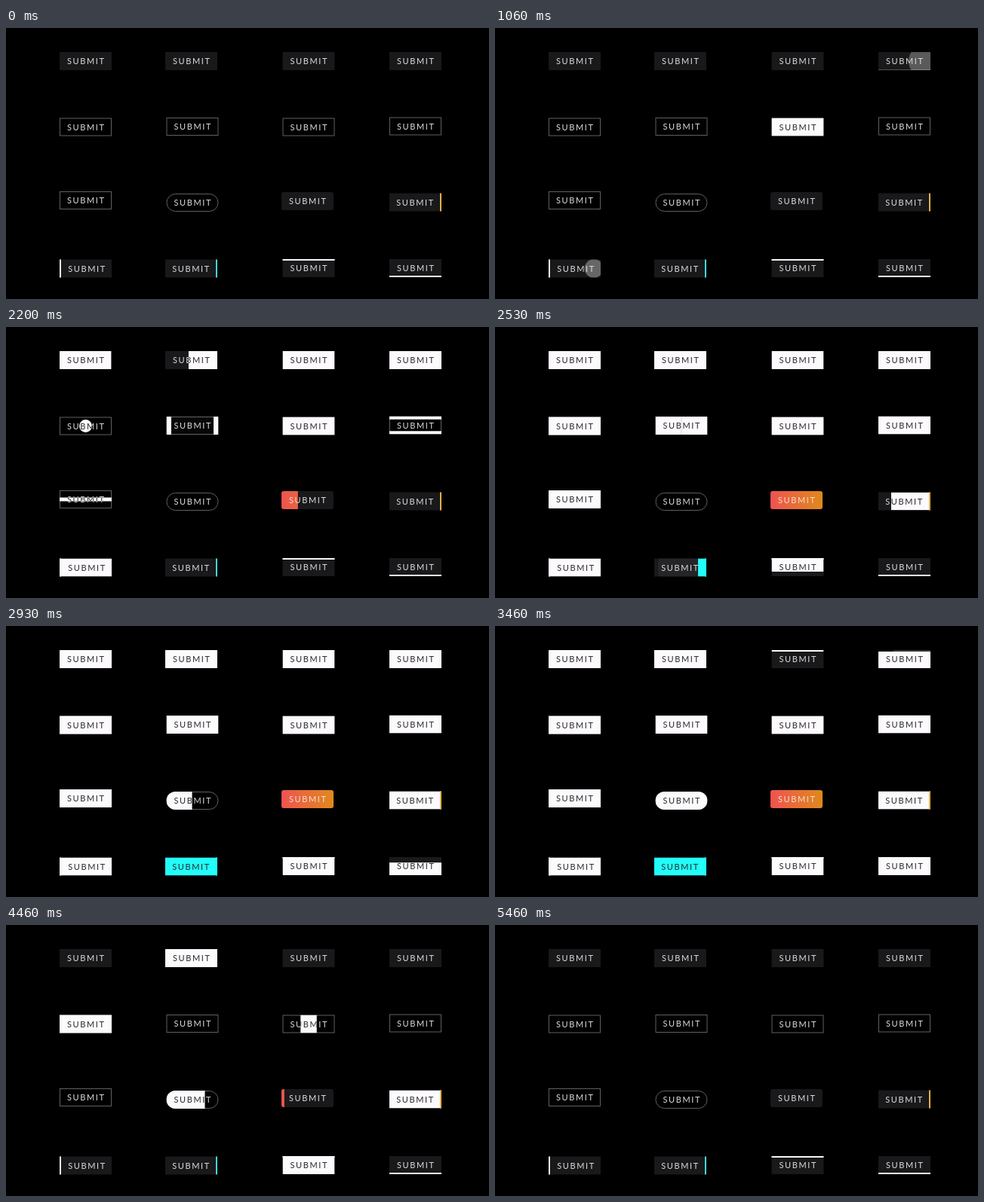
Recreate the animation shown at these times as an HTML page. Size 640 by 360 pixels, loop 6670 ms.

```html
<!DOCTYPE html>
<html lang="en">
<head>
<meta charset="utf-8">
<title>Submit buttons</title>
<style>
html, body { margin: 0; width: 100%; height: 100%; overflow: hidden; background: #000; }
svg { display: block; width: 100vw; height: 100vh; }
text { font: 400 11px Lato, "Open Sans", sans-serif; letter-spacing: 1.6px; }
</style>
</head>
<body>
<svg id="stage" viewBox="0 0 640 360">
  <defs>
    <linearGradient id="warm">
      <stop offset="0" stop-color="#ef5350"/>
      <stop offset="1" stop-color="#df891d"/>
    </linearGradient>
  </defs>
</svg>
<script>
const LOOP = 6670, STEP = 200 / 3, SPEED = 500;
const W = 69, H = 24, TAP_X = 60;
const DARK = '#19181a', WHITE = '#fcfafc', INK = '#2b2a2e', PALE = '#dcdcdc';
const stage = document.getElementById('stage');

const box = (x, y, w, h) => `M${x} ${y}h${w}v${h}h${-w}z`;

// Area covered by the fill when it is p complete
const wipes = {
  right: p => box(0, 0, W * p, H),
  left: p => box(W - W * p, 0, W * p, H),
  down: p => box(0, 0, W, H * p),
  up: p => box(0, H - H * p, W, H * p),
  sides: p => box(0, 0, W * p / 2, H) + box(W - W * p / 2, 0, W * p / 2, H),
  middle: p => box((W - W * p) / 2, 0, W * p, H),
  shutters: p => box(0, 0, W, H * p / 2) + box(0, H - H * p / 2, W, H * p / 2),
  band: p => box(0, (H - H * p) / 2, W, H * p),
  round: p => {
    const r = 37 * p;
    return `M${W / 2 - r} ${H / 2}a${r} ${r} 0 1 0 ${2 * r} 0a${r} ${r} 0 1 0 ${-2 * r} 0z`;
  }
};

const line = { outline: true };
const leftEdge = [0, 0, 2, H], rightEdge = [W - 2, 0, 2, H];
const topEdge = [0, 0, W, 2], bottomEdge = [0, H - 2, W, 2];
const buttons = [
  { x: 71, y: 32, wipe: 'right', on: 1730, off: 3975 },
  { x: 211, y: 32, wipe: 'left', on: 1930, off: 4580 },
  { x: 366.5, y: 32, wipe: 'down', on: 1240, off: 3060 },
  { x: 508, y: 32, wipe: 'up', on: 1018, off: 3360 },
  { x: 71, y: 119.5, wipe: 'round', on: 2030, off: 4610, ...line },
  { x: 212.5, y: 119, wipe: 'sides', on: 2045, off: 3560, ...line },
  { x: 366.5, y: 119.5, wipe: 'middle', on: 430, off: 4155, ...line },
  { x: 508, y: 118.5, wipe: 'shutters', on: 1990, off: 3500, ...line },
  { x: 71, y: 217, wipe: 'band', on: 2035, off: 3880, ...line },
  { x: 212.5, y: 220, wipe: 'right', on: 2680, off: 4285, rx: 12, ...line },
  { x: 365, y: 218, wipe: 'right', on: 2000, off: 4045, rx: 3, fill: 'url(#warm)', ink: '#f6e0cc' },
  { x: 508, y: 219.5, wipe: 'left', on: 2200, off: 4500, tx: 9.3, strip: rightEdge, tone: '#e0b04c', over: true },
  { x: 71, y: 307.5, wipe: 'right', on: 1039, off: 3665, tx: 11.3, strip: leftEdge },
  { x: 211, y: 307.5, wipe: 'left', on: 2390, off: 3720, tx: 9.3, strip: rightEdge, tone: '#45d6d6', fill: '#22fdfa' },
  { x: 366.5, y: 307, wipe: 'down', on: 2200, off: 4540, strip: topEdge },
  { x: 508, y: 307, wipe: 'up', on: 2620, off: 3620, strip: bottomEdge }
];

function add(parent, name, attrs, label) {
  const node = document.createElementNS('http://www.w3.org/2000/svg', name);
  for (const key in attrs) node.setAttribute(key, attrs[key]);
  if (label) node.textContent = label;
  return parent.appendChild(node);
}

function build(b, i) {
  const rx = b.rx || 0;
  const body = { width: W, height: H, rx };
  const root = add(stage, 'g', { transform: `translate(${b.x} ${b.y})` });
  add(add(root, 'clipPath', { id: 'body' + i }), 'rect', body);
  b.mask = add(add(root, 'clipPath', { id: 'wipe' + i }), 'path', {});

  const word = (parent, fill) =>
    add(parent, 'text', { x: b.tx || 10, y: 16, fill }, 'SUBMIT');
  const strip = () => {
    const [x, y, width, height] = b.strip;
    add(root, 'rect', { x, y, width, height, fill: b.tone || '#f4f4f4' });
  };

  if (b.outline) {
    add(root, 'rect', {
      x: .5, y: .5, width: W - 1, height: H - 1, rx: Math.max(0, rx - .5),
      fill: '#000', stroke: '#6a6a67', 'stroke-width': .9
    });
  } else {
    add(root, 'rect', { ...body, fill: DARK });
  }
  const inner = add(root, 'g', { 'clip-path': `url(#body${i})` });
  b.ripple = add(inner, 'circle', { cx: TAP_X, cy: H / 2, fill: '#c8c8c8' });
  word(root, PALE);
  if (b.strip && !b.over) strip();
  const cover = add(root, 'g', { 'clip-path': `url(#wipe${i})` });
  add(cover, 'rect', { ...body, fill: b.fill || WHITE });
  word(cover, b.ink || INK);
  if (b.over) strip();
}

// Same curve as CSS ease-in-out
function ease(x) {
  if (x <= 0) return 0;
  if (x >= 1) return 1;
  let lo = 0, hi = 1, s;
  for (let n = 0; n < 18; n++) {
    s = (lo + hi) / 2;
    const at = 3 * (1 - s) * s * (.42 * (1 - s) + .58 * s) + s * s * s;
    if (at < x) lo = s; else hi = s;
  }
  return s * s * (3 - 2 * s);
}

function draw(t) {
  for (const b of buttons) {
    const p = ease((t - b.on) / SPEED) - ease((t - b.off) / SPEED);
    b.mask.setAttribute('d', p > 0 ? wipes[b.wipe](p) : '');
    const age = t - (t < b.off ? b.on : b.off);
    const live = age > 0 && age < 160;
    b.ripple.setAttribute('r', live ? 4 + .37 * age : 0);
    b.ripple.setAttribute('opacity', live ? .52 * (1 - age / 160) : 0);
  }
}

buttons.forEach(build);
const start = performance.now();
function tick() {
  const t = (performance.now() - start) % LOOP;
  draw(Math.floor((t + 7) / STEP) * STEP - 5);
  requestAnimationFrame(tick);
}
tick();
</script>
</body>
</html>
```
